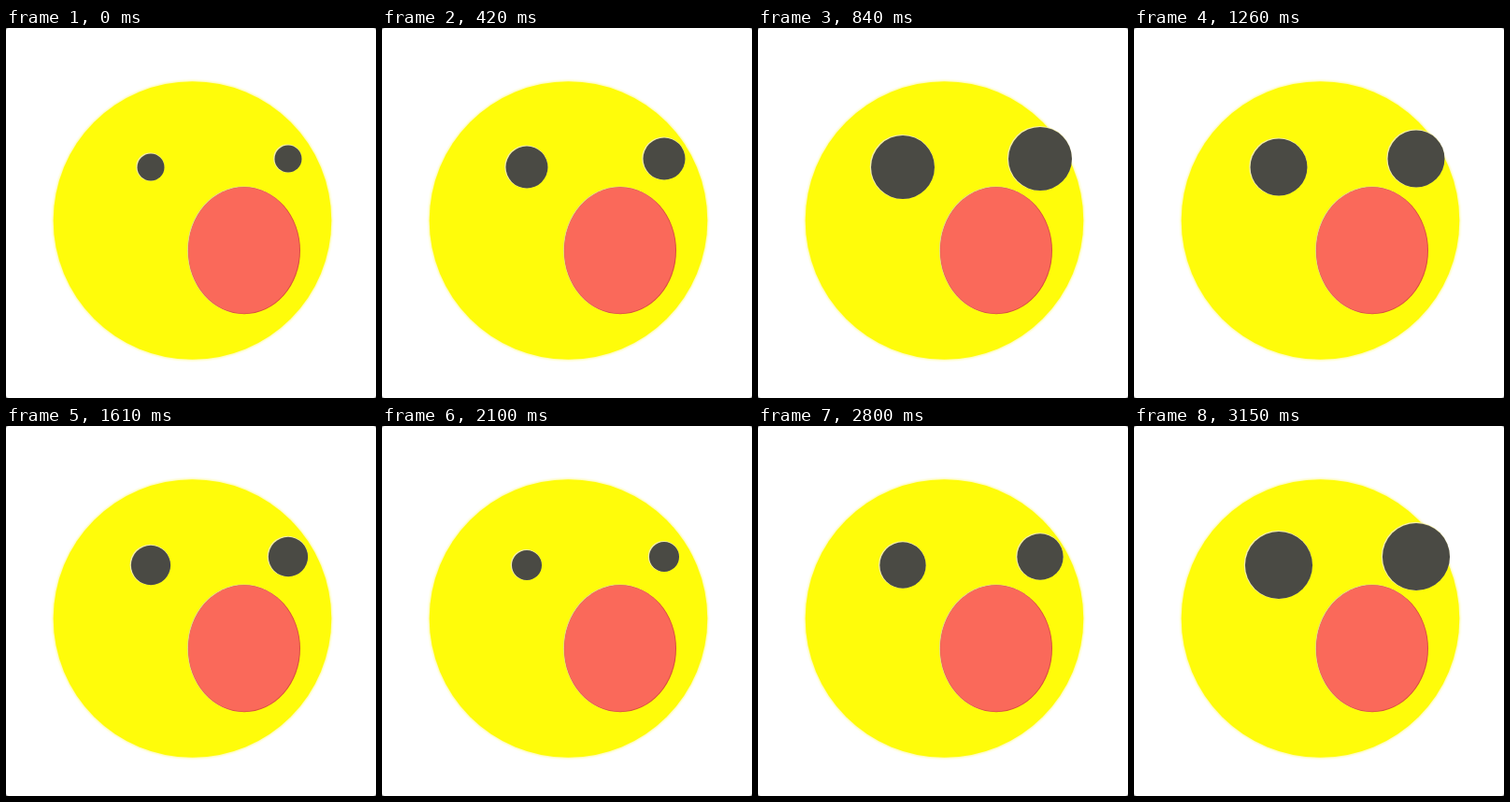
These frames come from a looping animation (396x396 px, 4480 ms). An HTML page:

```html
<!DOCTYPE html>
<html lang="en">
<head>
<meta charset="utf-8">
<title>Surprised face</title>
<style>
  html, body { margin: 0; width: 100%; height: 100%; overflow: hidden; background: #fff; }
  svg { display: block; width: 100vw; height: 100vh; }
</style>
</head>
<body>
<svg viewBox="0 0 396 396">
  <defs>
    <filter id="soft" x="-5%" y="-5%" width="110%" height="110%">
      <feGaussianBlur stdDeviation="1"/>
    </filter>
  </defs>
  <rect width="396" height="396" fill="#8a8a8a"/>
  <rect width="396" height="396" rx="3" fill="#fff"/>

  <circle cx="199.5" cy="206" r="149.8" fill="#fffb9c" filter="url(#soft)"/>
  <circle cx="199.5" cy="206" r="148.8" fill="#fffc0a"/>

  <ellipse cx="254" cy="237.7" rx="60" ry="68.2" fill="#e3d488"/>
  <ellipse cx="255" cy="238.2" rx="60" ry="68" fill="#d9503c"/>
  <ellipse cx="254.6" cy="237.9" rx="59.4" ry="67.5" fill="#fa695a"/>

  <g id="eyes"></g>
</svg>
<script>
const STEP = 70, LOOP = 4480, LAST = 45, PEAK = 15;
const HELD = [4, 14, 25];
const eyes = document.getElementById('eyes');

function disc(cx, cy, fill) {
  const c = document.createElementNS('http://www.w3.org/2000/svg', 'circle');
  c.setAttribute('cx', cx);
  c.setAttribute('cy', cy);
  c.setAttribute('fill', fill);
  eyes.append(c);
  return c;
}

const pairs = [[155, 149], [302, 140]].map(([x, y]) => ({
  rim: disc(x - 0.7, y - 0.5, '#f3eda6'),
  pupil: disc(x, y, '#4a4a44')
}));

// Grow to a sharp peak, then shrink and swell again along a parabola.
function radius(step) {
  let k = Math.min(step, LAST);
  if (HELD.includes(k)) k--;
  const r = k < PEAK
    ? 14.5 + 1.04 * k + 0.0486 * k * k
    : 16 + 0.094 * (k - 30.4) ** 2;
  return Math.min(r, 37);
}

function draw(now) {
  const r = radius(Math.floor((now % LOOP) / STEP));
  for (const { rim, pupil } of pairs) {
    rim.setAttribute('r', r + 0.6);
    pupil.setAttribute('r', r);
  }
}

const start = performance.now();
function tick() {
  draw(performance.now() - start);
  requestAnimationFrame(tick);
}
tick();
</script>
</body>
</html>
```
